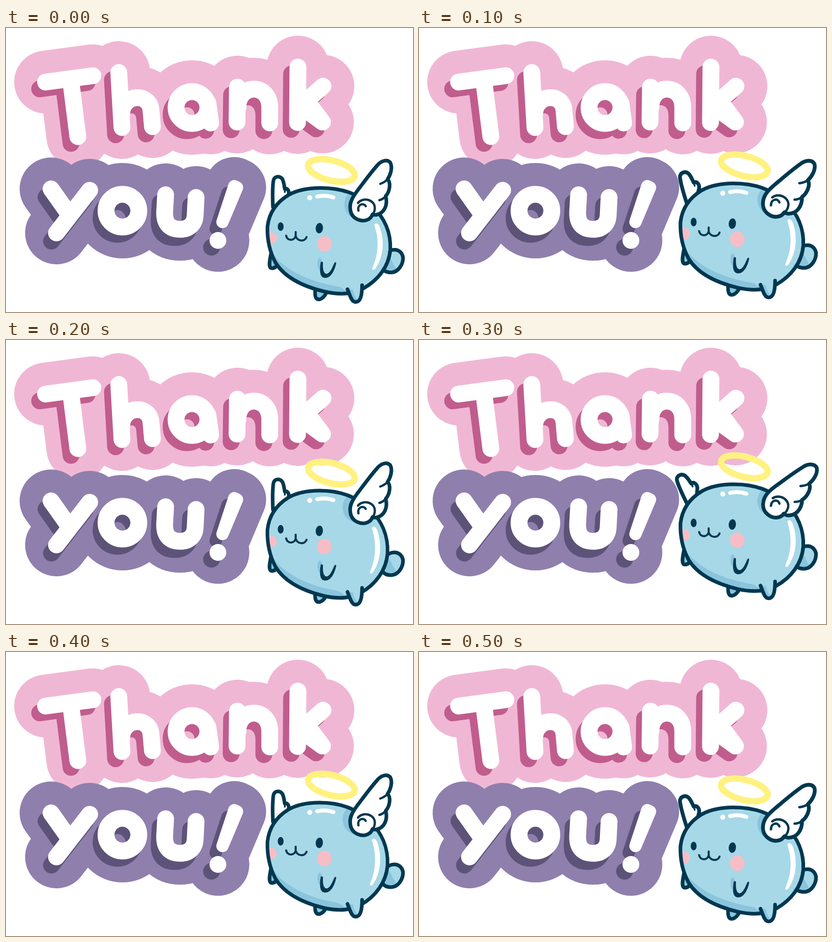
These frames come from a looping animation (895x625 px, 0.6 s). An HTML page with a canvas:

```html
<!DOCTYPE html>
<html lang="en">
<head>
<meta charset="utf-8">
<title>Thank you!</title>
<style>
html, body { margin: 0; width: 100%; height: 100%; overflow: hidden; background: #fff; }
canvas { display: block; }
</style>
</head>
<body>
<canvas id="stage" width="895" height="625" role="img" aria-label="Thank you!"></canvas>
<script>
const ctx = document.getElementById('stage').getContext('2d');
const NAVY = '#003850', SKY = '#a6d8e8', SHADE = '#8ac4dd', BLUSH = '#f7bdc6', HALO = '#fff280';
const RIM = 101;

const glyph = (d, dx, dy, width = 37, solid = false) => ({ path: new Path2D(d), dx, dy, width, solid });

const words = [
  {
    rim: '#f0b7d5', shadow: '#c05d8d',
    glyphs: [
      glyph('M87 119L191 105', -13, 15),
      glyph('M142 112L158 239', -15, 15),
      glyph('M248 98L255 219M254 192C254 144 317 140 319 183L322 217', -14, 16),
      glyph('M374 175a35 35 0 1 0 70 0a35 35 0 1 0 -70 0M444 165L450 209', -11, 16),
      glyph('M509 130L508 207M510 175C510 121 580 121 580 175L580 209', -13, 17),
      glyph('M642 86L641 208M697 128L654 166M664 164L696 207L656 178', -14, 15)
    ]
  },
  {
    rim: '#8f7fad', shadow: '#5d5278',
    glyphs: [
      glyph('M99 354L133 402M184 357L111 451', -11, 18),
      glyph('M220 402a36 36 0 1 0 72 0a36 36 0 1 0 -72 0', -11, 16),
      glyph('M351 367L349 402C347 430 360 443 383 443C402 443 415 432 416 412L418 373', -12, 18),
      glyph('M502 348L508 351L476 427Z', -15, 15, 27, true),
      glyph('M466 467.5h.01', -14, 15)
    ]
  }
];

const shapes = {
  body: 'M692 352C735 352 775 364 805 392C832 417 847 450 845 488C842 525 818 555 786 573C765 585 735 588 700 580C650 568 612 547 593 517C580 493 574 465 575 437C578 410 592 385 622 367C642 356 668 352 692 352Z',
  belly: 'M572 476C600 528 660 558 735 570L770 592L740 610L560 600Z',
  tail: 'M836 496C845 485 868 483 873 504C874 521 862 537 848 538C840 538 833 536 830 532',
  tailShade: 'M836 497C852 508 850 527 864 533C850 542 838 540 828 532Z',
  sideArm: 'M584 488C582 505 576 522 582 528C590 531 596 524 602 514',
  backFoot: 'M680 576C678 596 684 598 690 597C697 595 702 588 705 582',
  foot: 'M751 575C757 590 760 603 769 603C779 603 783 590 783 566',
  footShade: 'M751 575C757 590 760 603 769 603C772 603 774 602 776 599C768 595 764 585 763 576Z',
  arm: 'M692 516Q694 512 697 516C696 532 699 541 705 541C713 540 718 526 722 517Q726 513 726 518C722 537 713 550 702 550C690 550 689 535 692 516Z',
  mouth: 'M616 457C618 468 633 470 637 458C641 470 657 471 661 460M637 449V458',
  shine: 'M684 371C697 368 709 369 720 373',
  gloss: 'M810 434C811 428 818 429 821 436C833 465 831 503 812 530C808 534 804 532 806 527C820 497 820 464 810 434Z',
  wing: 'M757 398C755 383 764 370 772 359C788 338 800 321 815 304C824 292 838 288 845 296C851 308 845 324 839 333C847 340 844 360 835 370C840 390 832 407 815 411C812 412 809 411 806 410C802 422 788 427 775 422C764 418 758 409 757 398Z',
  wingLines: 'M839 333Q832 340 823 343M835 370Q829 377 821 379M774 385C786 371 811 378 811 396C811 403 809 407 806 410M775 402C772 388 786 384 791 392',
  farWing: 'M587 394C586 370 586 350 588 336C590 326 602 324 608 333C612 342 612 350 613 354C619 352 624 359 621 368L612 384Z',
  farLines: 'M613 354Q614 358 613 361'
};
for (const key in shapes) shapes[key] = new Path2D(shapes[key]);

// One pose per 100 ms step: lift, wing angles in degrees, wing reach, body stretch.
const poses = [
  { lift: 0, near: 0, far: 0, reach: 1, sx: 1, sy: 1 },
  { lift: 10, near: 13, far: -16, reach: 1.04, sx: 1, sy: 1.006 },
  { lift: 20.5, near: 0, far: 0, reach: 1, sx: .978, sy: 1.014 },
  { lift: 34.5, near: 17, far: -25, reach: 1.03, sx: 1, sy: 1.01 }
];
const order = [0, 1, 2, 3, 2, 1];

function fill(path, color) {
  ctx.fillStyle = color;
  ctx.fill(path);
}

function line(path, color, width) {
  ctx.strokeStyle = color;
  ctx.lineWidth = width;
  ctx.stroke(path);
}

function outlined(path, color, width = 8) {
  fill(path, color);
  line(path, NAVY, width);
}

function oval(x, y, rx, ry, color, tilt = 0) {
  ctx.fillStyle = color;
  ctx.beginPath();
  ctx.ellipse(x, y, rx, ry, tilt, 0, Math.PI * 2);
  ctx.fill();
}

function drawWing(shape, lines, x, y, degrees, reach, lineWidth) {
  ctx.save();
  ctx.translate(x, y);
  ctx.rotate(degrees * Math.PI / 180);
  ctx.scale(reach, reach);
  ctx.translate(-x, -y);
  outlined(shape, '#fff');
  line(lines, NAVY, lineWidth);
  ctx.restore();
}

function drawGlyph(g, color, extra = 0) {
  if (g.solid) fill(g.path, color);
  line(g.path, color, g.width + extra);
}

function drawWord({ rim, shadow, glyphs }) {
  for (const g of glyphs) drawGlyph(g, rim, RIM);
  for (const g of glyphs) {
    ctx.save();
    ctx.translate(g.dx, g.dy);
    drawGlyph(g, shadow);
    ctx.restore();
  }
  for (const g of glyphs) drawGlyph(g, '#fff');
}

function drawBody({ sx, sy }) {
  ctx.save();
  ctx.translate(571, 348);
  ctx.scale(sx, sy);
  ctx.translate(-571, -348);
  fill(shapes.body, SKY);
  ctx.save();
  ctx.clip(shapes.body);
  fill(shapes.belly, SHADE);
  oval(776, 388, 32, 33, SHADE);
  oval(582, 462, 14, 13, BLUSH);
  ctx.restore();
  line(shapes.body, NAVY, 8);
  fill(shapes.gloss, '#fff');
  ctx.restore();
}

function drawFace() {
  oval(604, 437, 6.5, 9.5, NAVY);
  oval(689, 440.5, 8, 11.5, NAVY, .1);
  oval(700, 475, 16, 17, BLUSH);
  line(shapes.mouth, NAVY, 4.5);
  oval(668, 373.5, 5.5, 5.5, '#fff');
  line(shapes.shine, '#fff', 8.5);
}

function drawHalo() {
  ctx.strokeStyle = HALO;
  ctx.lineWidth = 14;
  ctx.beginPath();
  ctx.ellipse(715.5, 313.5, 52.5, 22, .244, 0, Math.PI * 2);
  ctx.stroke();
}

function drawAngel(pose) {
  ctx.save();
  ctx.translate(0, -pose.lift);

  fill(shapes.tail, SKY);
  fill(shapes.tailShade, SHADE);
  line(shapes.tail, NAVY, 8);
  outlined(shapes.sideArm, SHADE);
  outlined(shapes.backFoot, SHADE);
  drawWing(shapes.farWing, shapes.farLines, 600, 385, pose.far, pose.reach, 4);

  drawBody(pose);

  fill(shapes.foot, SKY);
  fill(shapes.footShade, SHADE);
  line(shapes.foot, NAVY, 8);

  drawFace();
  oval(690, 519, 5, 13, SHADE);
  fill(shapes.arm, NAVY);

  drawWing(shapes.wing, shapes.wingLines, 783, 398, pose.near, pose.reach, 5);
  drawHalo();
  ctx.restore();
}

function render(now) {
  const step = Math.floor(now % 600 / 100);
  ctx.fillStyle = '#fff';
  ctx.fillRect(0, 0, 895, 625);
  words.forEach(drawWord);
  drawAngel(poses[order[step]]);
}

ctx.lineCap = ctx.lineJoin = 'round';
const start = performance.now();
function tick() {
  render(performance.now() - start);
  requestAnimationFrame(tick);
}
tick();
</script>
</body>
</html>
```
